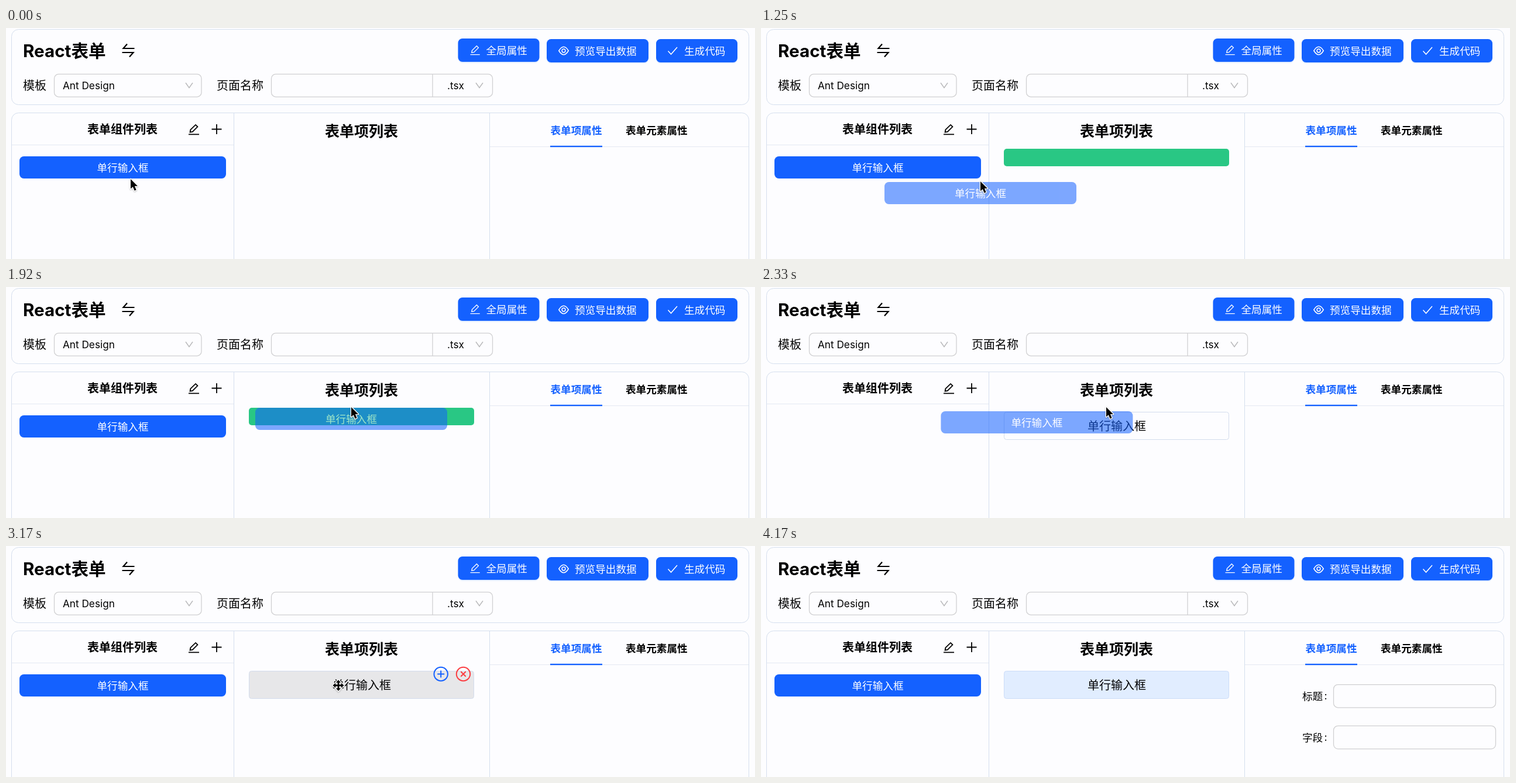
An HTML page for the animation above (5.41 s loop, 1280 px wide and 396 px high).

```html
<!DOCTYPE html>
<html lang="zh-CN">
<head>
<meta charset="utf-8">
<title>React表单</title>
<style>
html, body { margin: 0; height: 100%; overflow: hidden; background: #fdfdff; }
svg { display: block; width: 100vw; height: 100vh; }
text { font: 17.6px Inter, "Noto Sans CJK SC", "Noto Sans CJK", "Noto Sans CJK JP", sans-serif; }
.mid { text-anchor: middle; }
.bold { font-weight: 700; }
.big { font-size: 20px; }
.title { font-size: 25px; }
.latin { font-size: 17.2px; }
.white { fill: #fff; }
.blue { fill: #1461ff; }
.panel { fill: none; stroke: #d5dfee; }
.rule { stroke: #e4e9f2; }
.field { fill: none; stroke: #cfcfd1; stroke-width: 1.25; }
.icon { fill: none; stroke: #000; stroke-width: 1.8; }
.thin { fill: none; stroke: #fff; stroke-width: 1.5; }
.chevron { fill: none; stroke: #b8b8ba; stroke-width: 1.4; }
.raised { filter: drop-shadow(0 2.5px 0 #e3eeff); }
.cursor { stroke: #fff; stroke-width: 2.6; paint-order: stroke; stroke-linejoin: round; filter: drop-shadow(0 1px 1px #0004); }
</style>
</head>
<body>
<svg viewBox="0 0 1280 396">
  <defs>
    <path id="pencil" d="M0 17.3H18M2.6 13.6l.7-4.2L12 .9l3.4 3.4-8.6 8.6z"/>
    <path id="chevron" d="M-6-4.5L0 4 6-4.5"/>
    <path id="arm" d="M-1.2 0V-4.8H-4.2L0-9.6 4.2-4.8H1.2V0z"/>
  </defs>

  <!-- header -->
  <rect class="panel" x="9.5" y="2.5" width="1260" height="129" rx="12"/>
  <text class="bold" x="29" y="49.5" style="font-size:29.6px">React表单</text>
  <path class="icon" d="M219.5 35H200.5l6.5-7.5M198.5 42H217.5l-6.5 7.5" style="stroke-width:2.2"/>
  <g class="blue raised">
    <rect x="772.5" y="18" width="139" height="40" rx="7.5"/>
    <rect x="924" y="19" width="174" height="40" rx="7.5"/>
    <rect x="1111" y="19" width="139" height="40" rx="7.5"/>
  </g>
  <g class="thin">
    <use href="#pencil" transform="translate(793.5 30) scale(.9)"/>
    <path d="M944.8 39q8.2-13.5 16.4 0q-8.2 13.5-16.4 0z"/>
    <circle cx="953" cy="39" r="2.9"/>
    <path d="M1131.5 39.5l5 5.5 10.5-12"/>
  </g>
  <g class="white">
    <text x="820.5" y="44.7">全局属性</text>
    <text x="972" y="45.7">预览导出数据</text>
    <text x="1159" y="45.7">生成代码</text>
  </g>
  <text class="big" x="29" y="106">模板</text>
  <rect class="field" x="82.5" y="79" width="251.5" height="39" rx="7.5"/>
  <text class="latin" x="97" y="105">Ant Design</text>
  <use class="chevron" href="#chevron" x="313" y="98.5"/>
  <text class="big" x="360" y="106">页面名称</text>
  <rect class="field" x="453.5" y="79" width="378" height="39" rx="7.5"/>
  <path class="field" d="M729 79v39"/>
  <text class="latin" x="754" y="105">.tsx</text>
  <use class="chevron" href="#chevron" x="809" y="98.5"/>

  <!-- workspace -->
  <rect class="panel" x="9.5" y="145.5" width="1260" height="300" rx="12"/>
  <path class="panel" d="M389.5 146V396M826.5 146V396"/>
  <path class="rule" d="M10 200.5H389M827 203.5H1269"/>
  <text class="big bold mid" x="199" y="180.5">表单组件列表</text>
  <use class="icon" href="#pencil" x="312" y="165"/>
  <path class="icon" d="M351.5 173.5h17M360 165v17"/>
  <text class="title bold mid" x="607.5" y="186">表单项列表</text>
  <text class="bold blue" x="930.5" y="182">表单项属性</text>
  <text class="bold" x="1059" y="182">表单元素属性</text>
  <rect class="blue" x="930" y="201.8" width="89" height="2.4"/>

  <g id="source">
    <rect class="blue" x="23" y="220" width="353" height="38" rx="7.5"/>
    <text class="white mid" x="199.5" y="246">单行输入框</text>
  </g>
  <rect id="slot" x="415" y="207" width="385" height="30" rx="5" fill="#29c784"/>
  <g id="item">
    <rect id="itemBox" x="415.5" y="214.5" width="384" height="47" rx="4"/>
    <text class="big mid" x="608" y="246.3">单行输入框</text>
  </g>
  <g id="actions" fill="none" stroke-width="2">
    <g stroke="#1461ff" transform="translate(743.2 219.5)"><circle r="11.7"/><path d="M-6 0H6M0-6V6"/></g>
    <g stroke="#fb3d42" transform="translate(781.5 219.5) rotate(45)"><circle r="11.7"/><path d="M-6 0H6M0-6V6"/></g>
  </g>
  <g id="form">
    <text x="925" y="264">标题</text><text x="962.5" y="263">:</text>
    <rect class="field" x="978.5" y="237.5" width="277" height="39.5" rx="7.5"/>
    <text x="925" y="334.5">字段</text><text x="962.5" y="333.5">:</text>
    <rect class="field" x="978.5" y="308.3" width="277" height="39.5" rx="7.5"/>
  </g>
  <g id="ghost" opacity=".55">
    <rect class="blue" width="328" height="38" rx="7.5"/>
    <text class="white mid" x="164" y="26">单行输入框</text>
  </g>
  <path id="arrow" class="cursor" d="M0 0V16.6L3.8 13.2 6.6 19.8 9.6 18.5 6.9 12H12z"/>
  <g id="move" class="cursor">
    <use href="#arm"/><use href="#arm" transform="rotate(90)"/>
    <use href="#arm" transform="rotate(180)"/><use href="#arm" transform="rotate(270)"/>
    <path stroke="none" d="M-4.8-1.2h9.6v2.4h-9.6zM-1.2-4.8h2.4v9.6h-2.4z"/>
  </g>
</svg>
<script>
const LOOP = 5410, TICK = 250 / 3;
const GRAB = 1160, DROP = 2160, RETURN = 2242, HOVER = 2660, SELECT = 3490;

// Eased pointer moves: from and to in ms, then where the move ends
const start = [213, 259];
const moves = [
  { from: 80, to: 330, end: [202, 244] },
  { from: 1000, to: 1080, end: [279, 248] },
  { from: 1110, to: 1225, end: [375, 263] },
  { from: 1340, to: 1500, end: [414, 274] },
  { from: 1500, to: 1790, end: [590, 206] },
  { from: 2600, to: HOVER, end: [590, 199] },
  { from: 2920, to: 3160, end: [568, 239] },
  { from: 3430, to: 3680, end: [690, 208] },
  { from: 3680, to: 4000, end: [985, 332] }
];

const $ = id => document.getElementById(id);
const show = (id, on) => $(id).style.display = on ? '' : 'none';
const place = (id, [x, y]) => $(id).setAttribute('transform', `translate(${x} ${y})`);
const mix = (a, b, p) => a.map((v, i) => v + (b[i] - v) * p);

function ease(t, from, to) {
  const p = Math.min(1, Math.max(0, (t - from) / (to - from)));
  return p * p * (3 - 2 * p);
}

const pointer = t => moves.reduce((pos, m) => mix(pos, m.end, ease(t, m.from, m.to)), start);

// The dragged copy trails the pointer, settles, then flies back to its list
function ghost(t) {
  if (t > 1990) return mix([431, 210], [23, 220], ease(t, RETURN, RETURN + 250));
  const [x, y] = pointer(t - 12);
  return [x - 164, y + 1];
}

function draw(now) {
  const t = Math.floor((now % LOOP + 4) / TICK) * TICK;
  const during = (from, to) => t >= from && t < to;
  const selected = t >= SELECT;
  const [x, y] = pointer(t);
  const overSource = x < 376 && y > 220 && y < 258 && t < GRAB;
  const overItem = y > 214 && y < 262 && during(HOVER, 3750);
  const moving = overSource || overItem;

  show('source', !during(DROP, HOVER));
  show('slot', during(GRAB, DROP));
  show('item', t >= DROP);
  show('actions', during(HOVER, 3700));
  show('form', selected);
  show('ghost', during(GRAB, HOVER));
  show('move', moving);
  show('arrow', !moving && t < 4160);

  const [fill, stroke] = selected ? ['#e1edff', '#cbdcf8'] : [t >= HOVER ? '#e7e7e9' : '#fdfdff', '#d3dcec'];
  $('itemBox').setAttribute('fill', fill);
  $('itemBox').setAttribute('stroke', stroke);
  place('ghost', ghost(t));
  place(moving ? 'move' : 'arrow', [x, y]);
}

function loop() {
  draw(performance.now());
  requestAnimationFrame(loop);
}
loop();
</script>
</body>
</html>
```
